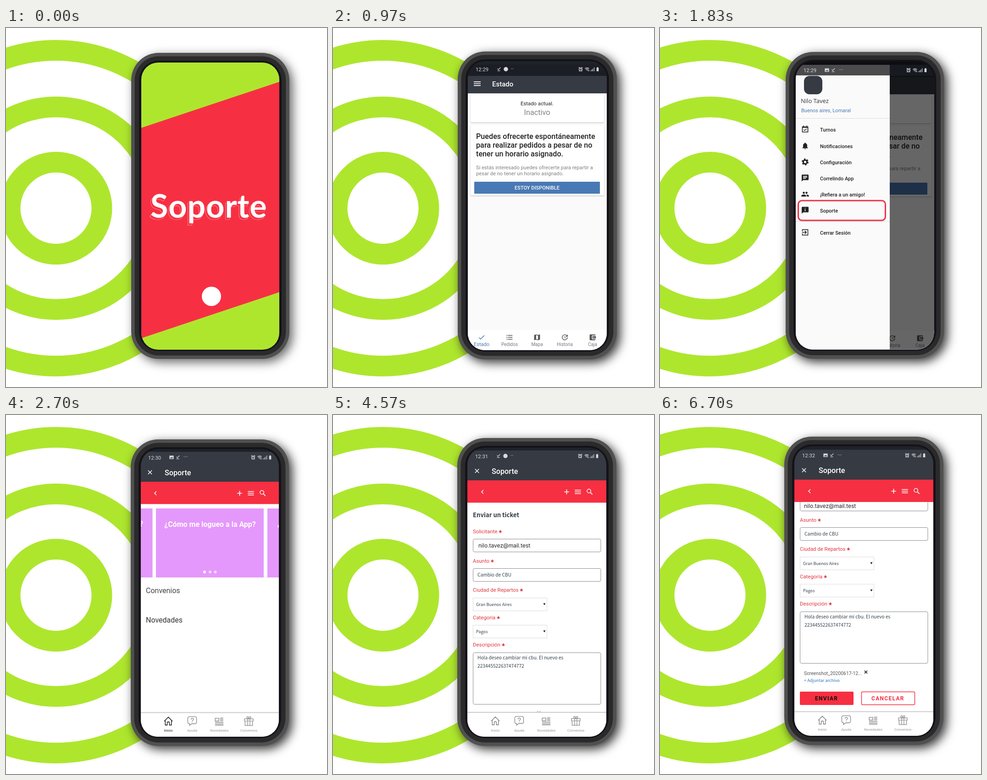
An HTML page for the animation above (8000 ms loop, 700 px wide and 780 px high).

```html
<!DOCTYPE html>
<html lang="es">
<head>
<meta charset="utf-8">
<title>Soporte</title>
<style>
html, body { margin: 0; width: 100%; height: 100%; overflow: hidden; background: #fff }
svg { display: block; width: 700px; height: 780px; font-family: Roboto, sans-serif }
.m { font-weight: 500 }
.b { font-weight: 700 }
.s { font-family: "Noto Sans CJK JP", "Noto Sans CJK SC", "Noto Sans CJK", Lato, sans-serif }
.i { font-family: Inter, sans-serif }
.o { font-family: "Open Sans", sans-serif }
.title { font: 700 70px Lato, sans-serif; letter-spacing: 1px }
</style>
</head>
<body>
<svg id="stage" viewBox="0 0 700 780"></svg>
<script>
const GREEN = '#aee62e', RED = '#f72f42', SLATE = '#363a43', BLUE = '#4979b4';

const rect = (x, y, w, h, fill, extra = '') =>
  `<rect x="${x}" y="${y}" width="${w}" height="${h}" fill="${fill}" ${extra}/>`;
const text = (x, y, size, fill, str, cls = '', extra = '') =>
  `<text x="${x}" y="${y}" font-size="${size}" fill="${fill}" class="${cls}" ${extra}>${str}</text>`;
const mid = (x, y, size, fill, str, cls = '') => text(x, y, size, fill, str, cls, 'text-anchor="middle"');
const circle = (x, y, r, fill, extra = '') => `<circle cx="${x}" cy="${y}" r="${r}" fill="${fill}" ${extra}/>`;
const shift = (x, y, body) => `<g transform="translate(${x} ${y})">${body}</g>`;
const path = (d, extra = '') => `<path d="${d}" ${extra}/>`;
const line = (d, width = 2) => path(d, `fill="none" stroke="currentColor" stroke-width="${width}"`);

const BUBBLE = 'M20 2H4c-1.1 0-2 .9-2 2v18l4-4h14c1.1 0 2-.9 2-2V4c0-1.1-.9-2-2-2z';
// Icons on a 24 x 24 grid
const ICONS = {
  check: line('M4 12.7l5 5L20.3 6.3'),
  menu: line('M3 7h18M3 12h18M3 17h18'),
  list: line('M7 6h14M7 12h14M7 18h14M2.5 6h3M2.5 12h3M2.5 18h3', 2.4),
  map: path('M20.5 3L15 5.1 9 3 3.4 4.9Q3 5 3 5.4V20.5q0 .5.6.5L9 18.9l6 2.1 5.6-1.9q.4-.1.4-.5V3.500zM15 19l-6-2.1V5l6 2.1z', 'fill-rule="evenodd"'),
  history: line('M20 12.100a8 8 0 1 1-2.200-5.600', 2) + path('M21 3v7.100h-6.800z') + line('M11.800 8v4.700l4 2.300', 1.5),
  wallet: path('M21 18v1q0 2-2 2H5q-2 0-2-2V5q0-2 2-2h14q2 0 2 2v1h-9q-2 0-2 2v8q0 2 2 2zM12 16h10V8H12zm4-2.500a1.500 1.500 0 1 1 .01 0z', 'fill-rule="evenodd"'),
  calendar: line('M4 5h16v15H4zM4 6.500h16M7 1v4M17 1v4', 2.2) + line('M8 13l2.600 2.800 5.500-5.500', 1.7),
  bell: path('M10 20h4a2 2 0 0 1-4 0zM18 16v-5c0-3.100-1.600-5.600-4.500-6.300V4a1.500 1.500 0 0 0-3 0v.7C7.600 5.400 6 7.900 6 11v5l-2 2v1h16v-1z'),
  gear: circle(12, 12, 5.500, 'none', 'stroke="currentColor" stroke-width="4"') +
    circle(12, 12, 8.200, 'none', 'stroke="currentColor" stroke-width="3.500" stroke-dasharray="4.300 4.290"'),
  chat: path(BUBBLE + 'M6 6h12v2H6zM6 9h12v2H6zM6 12h8v2H6z', 'fill-rule="evenodd"'),
  info: path(BUBBLE + 'M11 5h2v2h-2zM11 9h2v6h-2z', 'fill-rule="evenodd"'),
  people: circle(8, 8, 3, 'currentColor') + circle(16, 8, 3, 'currentColor') +
    path('M8 13c-2.300 0-7 1.200-7 3.500V19h14v-2.500C15 14.200 10.300 13 8 13zM16 13l-1 .05c1.200.8 2 2 2 3.450V19h6v-2.500C23 14.200 18.300 13 16 13z'),
  exit: line('M4 9V4h16v16H4v-5M3 12h12M11 7.500l4.500 4.500-4.500 4.500'),
  close: line('M6 6l12 12M18 6L6 18'),
  back: line('M15 6l-6 6 6 6', 2.4),
  plus: line('M12 5v14M5 12h14', 2.3),
  search: circle(9.500, 9.500, 5.500, 'none', 'stroke="currentColor" stroke-width="2"') + line('M13.700 13.700l6 6', 2.3),
  home: line('M2.500 12.500L12 3l9.500 9.500M5 11v10h4.500v-6q2.500-2.500 5 0v6H19V11', 1.6),
  help: line('M6 2h12q4 0 4 4v8q0 4-4 4h-7l-5 4v-4q-4 0-4-4V6q0-4 4-4z', 1.4) +
    line('M9.500 8.500c0-4 5.500-3.500 5.500-.5 0 2-3 2-3 4.500M12 14v1.500', 1.4),
  news: line('M2 5h9v7H2zM14 4.500h8M14 8h8M14 11.500h8M1.500 15.500h21M1.500 19h21M1.500 22h21', 1.6),
  gift: line('M2 7h20v5H2zM3.500 12v10h17V12M9.500 7v15M14.500 7v15', 1.3) +
    line('M12 7C7 7 6 2 9 2q2 0 3 4 1-4 3-4c3 0 2 5-3 5z', 1.3),
  alarm: circle(12, 13, 7, 'none', 'stroke="currentColor" stroke-width="3"') + line('M12 8v5l3 2M3 6l4-4M21 6l-4-4M5 22l3-3M19 22l-3-3', 2.5),
  wifi: line('M2 9q10-8 20 0M5 13q7-6 14 0M9 17q3-3 6 0', 2.5) + line('M17 15v7M21 15v7', 2),
  signal: line('M4 22v-5M9 22v-9M14 22V9M20 22V3', 2.5),
  battery: path('M7 5h3V2h4v3h3v17H7z'),
  picture: path('M2 4h20v16H2zM5 17h14l-5-7-3 4-2-2z', 'fill-rule="evenodd"'),
  done: line('M4 9l5 5L20 3M4 20h14', 2.8)
};
const icon = (name, x, y, size, color) =>
  `<g transform="translate(${x - size / 2} ${y - size / 2}) scale(${size / 24})" color="${color}" fill="currentColor">${ICONS[name]}</g>`;

let clips = 0;
function phone(x, y, right, bottom, body, shade = .8) {
  const w = right - x, h = bottom - y, id = 'screen' + clips++;
  const layer = (d, fill, extra = '') => rect(x + d, y + d, w - 2 * d, h - 2 * d, fill, `rx="${60 - d}" ${extra}`);
  const screen = rect(x + 22, y + 21, w - 44, h - 41, '#1e2329', 'rx="37"');
  return `<clipPath id="${id}">${screen}</clipPath>` +
    layer(0, '#505050', `style="filter:drop-shadow(7px 7px 11px rgba(0,0,0,${shade}))"`) +
    layer(7.5, '#2a2a2b') + layer(17, '#15121a') +
    `<g clip-path="url(#${id})">${screen}${body}</g>`;
}

// Status bar; cy is the vertical centre
function status(x, cy, time, chat) {
  const c = '#d8dadd';
  const left = chat
    ? icon('done', x + 51, cy, 10, c) + circle(x + 66, cy, 4.7, c) + text(x + 77, cy + 3, 12, c, '··')
    : icon('picture', x + 51, cy, 11, c) + icon('done', x + 65, cy, 10, c) + text(x + 77, cy + 3, 12, c, '···');
  return text(x, cy + 4.5, 11.3, c, time) + left +
    ['alarm', 'wifi', 'signal', 'battery'].map((n, i) => icon(n, x + [229, 243, 255, 266][i], cy, 11, c)).join('');
}

function splash() {
  const word = (x, y, paint) => `<text x="${x}" y="${y}" class="title" ${paint}>Soporte</text>`;
  return rect(290, 70, 310, 632, GREEN) + path('M295 217L596 117V574L295 674z', `fill="${RED}"`) +
    word(312, 416, 'fill="none" stroke="#fff" stroke-opacity=".6" stroke-width=".7"') +
    word(315, 412, 'fill="#fff"') + circle(448, 583, 21, '#fff');
}

function statePage() {
  const card = (y, h) => rect(300, y, 291, h, '#fff', 'rx="2" style="filter:drop-shadow(0 1px 1px rgba(0,0,0,.25))"');
  const tabs = [['check', 'Estado', 324], ['list', 'Pedidos', 385], ['map', 'Mapa', 445], ['history', 'Historia', 505.5], ['wallet', 'Caja', 566]];
  return rect(280, 104, 330, 38, SLATE) + rect(280, 142, 330, 570, '#fafafa') +
    icon('menu', 314.5, 121, 20, '#fff') + text(347, 127, 15, '#fff', 'Estado', 'm') +
    card(145, 60) + mid(445, 168, 11.4, '#222', 'Estado actual.') + mid(445, 189, 16.2, '#808080', 'Inactivo') +
    card(211, 153) +
    ['Puedes ofrecerte espontáneamente', 'para realizar pedidos a pesar de no', 'tener un horario asignado.']
      .map((s, i) => text(312, 241 + i * 19, 16.2, '#222', s, 'm')).join('') +
    text(312, 307, 11.2, '#808080', 'Si estás interesado puedes ofrecerte para repartir a') +
    text(312, 320, 11.2, '#808080', 'pesar de no tener un horario asignado.') +
    rect(308, 334, 274, 26, BLUE, 'rx="1"') + mid(445, 351, 11, '#fff', 'ESTOY DISPONIBLE', 'm') +
    rect(280, 656, 330, 50, '#fff') +
    tabs.map(([n, s, x], i) => icon(n, x, 672, 17, i ? '#555' : BLUE) +
      mid(x, 691, i ? 10 : 11, i ? '#777' : BLUE, s)).join('');
}

function drawer() {
  const items = [['calendar', 'Turnos', 220], ['bell', 'Notificaciones', 256], ['gear', 'Configuración', 291],
    ['chat', 'Correlindo App', 326], ['people', '¡Refiera a un amigo!', 361], ['info', 'Soporte', 396], ['exit', 'Cerrar Sesión', 444]];
  return shift(1, 2, statePage()) + rect(280, 60, 330, 650, 'rgba(0,0,0,.6)') +
    rect(501, 80, 100, 24, '#171a20') + rect(290, 103, 211, 600, '#fafafa') + rect(290, 80, 211, 23, '#4b4b4e') +
    status(313, 91.5, '12:29') + rect(314, 104, 40, 40, SLATE, 'rx="12"') +
    text(307, 163, 13, '#333', 'Nilo Tavez', 'o') + text(308, 183, 11, BLUE, 'Buenos aires, Lomaral') +
    rect(290, 196, 211, 1, '#ddd') + rect(290, 420, 211, 1, '#ddd') +
    items.map(([n, s, y]) => icon(n, 316.5, y, 18, '#222') + text(349, y + 5, 11, '#222', s, 'm')).join('') +
    rect(301.500, 375, 190, 43, 'none', 'rx="8" stroke="#f0324a" stroke-width="3"');
}

// Support page frame; y is the top of the red bar
function support(y, time, chat, body, navY, active) {
  const tabs = [['home', 'Inicio', 354], ['help', 'Ayuda', 406], ['news', 'Novedades', 465], ['gift', 'Convenios', 529.5]];
  return rect(280, y + 40, 330, 530, '#fff') + body +
    rect(280, y - 65, 330, 66, SLATE) + status(310, y - 53, time, chat) +
    icon('close', 314, y - 20.5, 17, '#fff') + text(346, y - 14.5, 16.2, '#fff', 'Soporte', 'm') +
    rect(280, y, 330, 48.500, RED) +
    [['back', 326, 16], ['plus', 509.500, 18], ['menu', 534, 18], ['search', 560, 18]]
      .map(([n, x, size]) => icon(n, x, y + 25, size, '#fff')).join('') +
    rect(280, navY, 330, 70, '#fff') + rect(280, navY - 1, 330, 2, '#ccc') +
    tabs.map(([n, s, x], i) => {
      const on = active && !i;
      return icon(n, x, navY + 18.5, i == 2 ? 21 : 23, on ? '#222' : '#888') + mid(x, navY + 41.5, 8, on ? '#222' : '#999', s);
    }).join('');
}

const homePage = () =>
  [[280, 39.500], [327, 235], [570, 40]].map(([x, w]) => rect(x, 203, w, 150, '#e598fb')).join('') +
  mid(445, 242.500, 16, '#fff', '¿Cómo me logueo a la App?', 'b') +
  text(291, 242, 16, '#fff', '?', 'b') + text(592, 242, 16, '#fff', '¿', 'b') +
  [433, 445, 456.500].map((x, i) => circle(x, 341, 3, i ? '#f3dcfa' : '#fff')).join('') +
  text(305, 387, 16, '#444', 'Convenios') + text(305, 451, 16, '#333', 'Novedades');

function form(filled, mailX = 317, mailY = 288) {
  const ink = '#34424c';
  const label = (y, s) => text(305, y, 11.4, '#e0353f', `${s}<tspan dx="3" dy="4" font-size="15" class="b" fill="#d8121f">*</tspan>`);
  const box = (y, h) => rect(305.5, y + .5, 278.5, h, '#fff', 'rx="3" stroke="#8c8c8c"');
  const select = (y, s) => rect(305.5, y + .5, 161, 28, '#fff', 'stroke="#ddd"') +
    (filled ? text(312, y + 18, 9.2, ink, s, 's') : '') + path(`M458.500 ${y + 12}h5l-2.500 4.500z`, 'fill="#222"');
  const value = (y, s, size = 10.2) => filled ? text(315, y, size, ink, s, 's') : '';
  return text(305, 222, 13.1, '#2f3941', 'Enviar un ticket', 's b') +
    label(257, 'Solicitante') + box(269, 28) + (filled ? text(mailX, mailY, 12, '#222', 'nilo.tavez@mail.test', 'i') : '') +
    label(321, 'Asunto') + box(333, 28) + value(351, 'Cambio de CBU') +
    label(384, 'Ciudad de Repartos') + select(397, 'Gran Buenos Aires') +
    label(444, 'Categoría') + select(456, 'Pagos') +
    label(503, 'Descripción') + box(516, 112) +
    value(531, 'Hola deseo cambiar mi cbu. El nuevo es') + value(549, '223445522637474772') +
    (filled ? text(314, 654, 10.4, '#555', 'Screenshot_20200617-12...') +
      path('M446 644.500l6 6M452 644.500l-6 6', 'stroke="#444" stroke-width="2"') : '') +
    text(314, 669, 9.2, '#2b72b8', '+ Adjuntar archivo', 's') +
    rect(305, 690, 117, 29, RED, 'rx="2"') + text(338, 709, 12, '#111', 'ENVIAR', 'b', 'letter-spacing="1.3"') +
    rect(439.500, 690.500, 116, 28, '#fff', `rx="2" stroke="${RED}" stroke-width="1.500"`) +
    text(461, 709, 12, RED, 'CANCELAR', 'b', 'letter-spacing="1.3"');
}

const scenes = [
  [0, phone(273, 54, 618, 719, splash(), .6)],
  [970, phone(272, 51, 619, 720, rect(280, 79, 330, 26, '#1c1e25') + status(311, 89.5, '12:29', true) + statePage())],
  [1830, phone(274, 52, 619.500, 718.500, drawer())],
  [2700, phone(272, 53, 617, 719, support(145, '12:30', false, homePage(), 646.500, true))],
  [3770, phone(272, 53, 617, 719, support(145, '12:30', false, shift(0, 3, form(false)), 646.500))],
  [4570, phone(271, 50, 618, 719, support(142, '12:31', true, form(true), 646))],
  [6700, phone(271, 47, 618, 717, support(140.500, '12:32', false, shift(0, -89, form(true, 314, 291)), 644.500))]
];

const stage = document.getElementById('stage');
stage.innerHTML =
  [100, 220, 343].map(r => circle(109, 391.500, r, 'none', `stroke="${GREEN}" stroke-width="45"`)).join('') +
  scenes.map(([, body]) => `<g class="scene">${body}</g>`).join('');
const groups = stage.querySelectorAll('.scene');

function draw(now) {
  const t = now % 8000;
  const current = scenes.findLastIndex(([start]) => t >= start);
  groups.forEach((g, i) => g.style.display = i === current ? '' : 'none');
  requestAnimationFrame(() => draw(performance.now()));
}
draw(0);
</script>
</body>
</html>
```
